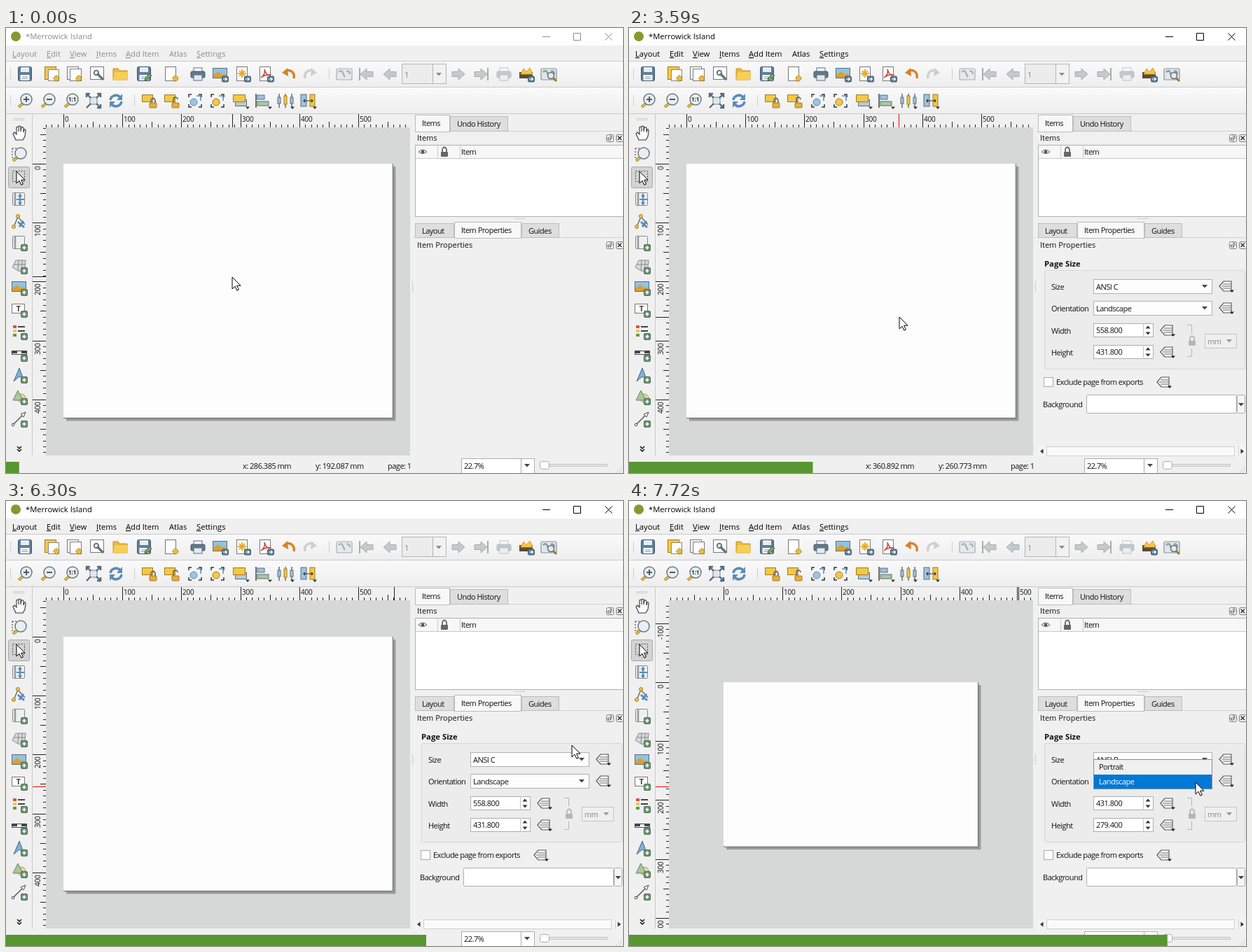
Recreate the animation shown at these times as an HTML page. Size 881 px wide and 636 px high, loop 8000 ms.

```html
<!DOCTYPE html>
<html lang="en">
<head>
<meta charset="utf-8">
<title>Layout page size</title>
<style>
html, body { margin: 0; width: 100%; height: 100%; overflow: hidden; background: #f0f0f0; }
svg { display: block; }
text { font: 11px 'Open Sans', 'Noto Sans', sans-serif; white-space: pre; }
.n { letter-spacing: -.5px; }
.m { font-size: 11.2px; }
.b { font-weight: bold; font-size: 11.3px; }
.s { font-size: 10px; letter-spacing: -.2px; }
</style>
</head>
<body>
<svg id="stage" xmlns="http://www.w3.org/2000/svg" width="881" height="636" viewBox="0 0 881 636"></svg>
<script>
// ---- drawing helpers
const R = (x, y, w, h, f = 'none', s = 'none', k = 1, r = 0) =>
  `<rect x="${x}" y="${y}" width="${w}" height="${h}" rx="${r}" fill="${f}" stroke="${s}" stroke-width="${k}"/>`;
const P = (d, f = 'none', s = 'none', k = 1) =>
  `<path d="${d}" fill="${f}" stroke="${s}" stroke-width="${k}"/>`;
const C = (x, y, r, f = 'none', s = 'none', k = 1) =>
  `<circle cx="${x}" cy="${y}" r="${r}" fill="${f}" stroke="${s}" stroke-width="${k}"/>`;
const T = (x, y, t, c = 'n', f = '#111', more = '') =>
  `<text x="${x}" y="${y}" class="${c}" fill="${f}" ${more}>${t}</text>`;
const at = (x, y, s, o = 1) => `<g transform="translate(${x} ${y})" opacity="${o}">${s}</g>`;
const G = (id, s, more = '') => `<g id="${id}" ${more}>${s}</g>`;
const box = (x, y, w, h, f = '#fff', s = '#adadad', r = 0) => R(x + .5, y + .5, w - 1, h - 1, f, s, 1, r);
const row = (y, ...icons) => icons.map(([x, s, o]) => at(x, y, s, o)).join('');
const dots = (x, y, n, dx, dy) =>
  Array.from({ length: n }, (_, i) => R(x + i * dx, y + i * dy, 1, 1, '#aaa')).join('');

// ---- icons, centred on the origin
const slate = '#5c6f7c', blue = '#5b8cb8', gold = '#f4c845', brown = '#a07c22';
const down = P('M-4-2H4L0 2.5Z', '#444');
const badge = at(7, 7, R(-4.5, -4.5, 9, 9, '#6f9474', '#4c6b52', 1, 1.5) + P('M-2.5 0H2.5M0-2.5V2.5', 'none', '#fff', 1.5));
const out = at(7, 7, R(-4.5, -4, 9, 8, '#5a7d97', '#3d5a70', 1, 1.5) + P('M-3 0H2M0-2L2.5 0 0 2', 'none', '#fff', 1.2));
const spark = at(6, 6, C(0, 0, 3.5, '#f7d34f', brown) + P('M0-5.5V5.5M-5.5 0H5.5', 'none', '#e0ae2c'));
const sheet = R(-8.5, -10.5, 15, 20, '#fff', '#777');
const floppy = R(-9.5, -10.5, 19, 20, '#5f7f9b', '#3c566d', 1, 2) + R(-6, -10, 12, 7, '#e6edf2') + R(-6.5, 1, 13, 8, '#f8f8f8') + P('M-4 4H4M-4 6.5H4', 'none', '#8a9aa6');
const wrench = P('M-1-1L8 8', 'none', '#68757e', 3.5) + C(-2, -2, 3.2, 'none', '#68757e', 2);
const pencil = P('M1 9L2 5 8-1 11 2 5 8Z', '#7aa06c', '#46613c');
const folder = P('M-10 8V-8H-3L-1-5H10V8Z', '#e9b93c', '#c59420') + P('M-10 8L-8-3H10V8Z', '#f7ce57');
const printer = R(-6, -9, 12, 6, '#fff', slate) + R(-10, -4, 20, 9, '#64798a', '#46596a', 1, 1.5) + R(-6, 1, 12, 8, '#dfeaf2', slate);
const photo = R(-10.5, -8.5, 20, 14, '#8ec3e6', slate) + P('M-10 5V1L-3-4 3 1 6-1 10 2V5Z', '#dca02e');
const arrow = P('M8 6C10-5 0-7-4-4', 'none', '#d9822b', 3.5) + P('M-9-2L-1-9 0 3Z', '#d9822b');
const map = R(-11, -8, 22, 16, '#e2e6e8', '#87919a', 1.2, 2) + P('M-8-3Q-4-7-2-2T1 4M3-4Q7-6 8 0', 'none', '#8b98a1', 2.5);
const step = P('M-9 0L0-8V-3.5H9V3.5H0V8Z', '#b8c0c5', '#929ca3');
const jump = step + P('M-10-9V9', 'none', '#929ca3', 2);
const flip = s => `<g transform="scale(-1 1)">${s}</g>`;
const lens = s => P('M-3 4L-9 9', 'none', brown, 4) + P('M-3 4L-9 9', 'none', gold, 2) + C(2, -2, 8, '#e8eff3', '#6d7880', 1.5) + at(2, -2, s);
const lock = P('M-3 0V-3A3 3.5 0 0 1 3-3V0', 'none', '#666', 1.8) + R(-5, 0, 10, 7, '#666', 'none', 1, 1);
const padlock = c => R(-10.5, -8.5, 15, 10, gold, brown) + at(5, 3, P(c, 'none', '#6b6b6b', 1.8) + R(-5, 0, 10, 7, '#e9ad3a', brown, 1, 1));
const corners = P('M-9-5V-9H-5M5-9H9V-5M9 5V9H5M-5 9H-9V5', 'none', '#333', 1.5);
const shapes = C(-2, 2, 5, '#9fc3e0', blue) + P('M2-7H8V0', 'none', blue, 1.5);
const drop = at(10, 10, P('M-3-1.5H3L0 2Z', '#333'));
const pointer = P('M0 0V17L4 13.2 6.8 19.2 9.4 18 6.7 12.2H12Z', '#fff', '#000', 1);
const override = P('M-9 0L-3-7H8V7H-3Z', '#fdfdfd', '#555', 1.2) + P('M-4-3H7M-6 0H7M-4 3H7', 'none', '#666', 1.2) + at(9, 7, P('M-3-1.5H3L0 2Z', '#222'));
const mapBase = R(-9.5, -9.5, 17, 18, '#eef0f0', '#888', 1, 1) + P('M-6-9V8', 'none', '#999', 2.5);

// ---- window chrome
const menus = [['Layout', 9], ['Edit', 58], ['View', 91], ['Items', 129], ['Add Item', 171], ['Atlas', 233], ['Settings', 272]]
  .map(([s, x]) => T(x, 41, s === 'Atlas' ? s : `<tspan text-decoration="underline">${s[0]}</tspan>${s.slice(1)}`, 'm', 'currentColor')).join('');
const head = R(0, 0, 881, 25, '#fff') + C(14, 12, 7, '#809c2e') + G('head',
  T(28, 16, '*Merrowick Island', 'm', 'currentColor') + menus +
  P('M766 12.5H777M810.5 7.5H820.5V17.5H810.5ZM855.5 7.5L865.5 17.5M865.5 7.5L855.5 17.5', 'none', 'currentColor'));

const bar1 = row(66,
  [27, floppy], [66, R(-10.5, -10.5, 16, 18, gold, brown) + R(-5.5, -6.5, 15, 16, '#fff', '#888') + spark],
  [98, R(-10.5, -10.5, 16, 18, '#fff', '#777') + R(-6.5, -7.5, 16, 17, '#fff', '#777') + spark],
  [131, R(-10.5, -10.5, 19, 18, '#fff', '#777') + wrench], [163, folder], [197, floppy + pencil], [236, sheet + spark],
  [274, printer], [306, photo + out], [338, sheet + P('M-1-7V5M-7-1H5M-5-5L3 3M3-5L-5 3', 'none', '#e3ae2f', 2) + out],
  [371, sheet + P('M-7 5Q0 0-2-7Q1 3 6 1Q0 0-7 5', 'none', '#c8443a', 1.5) + out], [403, arrow],
  [435, flip(P('M8 6C10-5 0-7-4-4', 'none', '#999', 3.5) + P('M-9-2L-1-9 0 3Z', '#999')), .4],
  [483, map, .7], [515, jump, .8], [548, step, .8], [646, flip(step), .8], [678, flip(jump), .8], [711, printer, .35],
  [743, R(-10, -3, 19, 9, '#5c4a36') + P('M-8 0L-4-8 0-3 5-9 9 0Z', gold, '#d39a27') + out], [775, map + C(3, 2, 4.5, '#dfeaf2', slate, 1.5) + P('M6 5L11 10', 'none', brown, 3)])
  + box(565, 51, 64, 29, '#f2f2f2', '#b5b5b5') + box(565, 51, 45, 29, '#ececec', '#b5b5b5') + T(569, 71, '1', 'n', '#888') + at(618, 66, down, .6);
const bar2 = row(104,
  [27, lens(P('M-4 0H4M0-4V4', 'none', '#4a5b66', 2))], [60, lens(P('M-4 0H4', 'none', '#4a5b66', 2))], [93, lens(T(-6, 3, '1:1', 'b', '#333', 'style="font-size:8px"'))],
  [125, R(-5, -5, 10, 10, '#dfe8ee', '#77848c') + P('M-10-10L-4-4M10-10L4-4M-10 10L-4 4M10 10L4 4M-10-5V-10H-5M5-10H10V-5M10 5V10H5', 'none', '#4f6b80', 2.4)],
  [157, P('M-8-1A8 8 0 0 1 6-5M8 1A8 8 0 0 1-6 5', 'none', blue, 3.5) + P('M9-10V-1H1ZM-9 10V1H-1Z', blue)],
  [205, padlock('M-3 0V-3A3 3.5 0 0 1 3-3V0')], [237, padlock('M-3 0V-4A3 3.5 0 0 1 3-5')],
  [270, corners + shapes], [302, corners + C(-2, 2, 5, gold, brown) + P('M2-7H8V0', 'none', blue, 1.5)],
  [335, R(-7.5, -1.5, 16, 9, '#b7c9d6', slate) + R(-10.5, -8.5, 17, 10, gold, brown) + drop],
  [367, P('M-10-10V10', 'none', '#444', 1.5) + R(-8, -8, 10, 6, '#9fc3e0', slate) + R(-8, 1, 16, 6, '#a9c7a2', slate) + drop],
  [399, P('M-9-10V10M0-10V10M9-10V10', 'none', '#555', 1.3) + R(-11, -5, 4, 9, '#9fc3e0', slate) + R(-2, -7, 4, 12, gold, brown) + R(7, -5, 4, 9, '#9fc3e0', slate) + drop],
  [431, R(-10, -9, 8, 17, '#9fc3e0', slate) + R(3, -9, 7, 17, gold, brown) + P('M-6 0H7M-4-2L-6 0-4 2M5-2L7 0 5 2', 'none', '#333', 1.2) + drop]);

const tools = [
  [150, P('M-5 10L-9 1-7-1-4 2V-8Q-2-10-1-8V-2-9Q1-11 2-9V-2L3-8Q5-9 6-7V-1L7-5Q9-6 9-3L8 5 5 10Z', '#fff', '#333', 1.1)],
  [181, `<rect x="-10" y="-9" width="13" height="14" fill="none" stroke="#333" stroke-dasharray="2 2"/>` + lens('')],
  [213, box(-16, -15, 31, 31, '#d3d3d3', '#a8a8a8', 2) + `<rect x="-9.500" y="-8.500" width="17" height="15" fill="none" stroke="#444" stroke-dasharray="2 2"/>` + at(-4, -8, pointer)],
  [245, mapBase + P('M1-6V6M-4 0H7M-1-4L1-7 3-4M-1 4L1 7 3 4', 'none', blue, 2.2)],
  [276, P('M-8 8L-2-6 8 5', 'none', slate, 1.5) + C(-2, -7, 2.5, gold, brown) + C(-8, 8, 2.5, gold, brown) + P('M-2 1L7 9M6 0L0 8', 'none', blue, 3)],
  [307, mapBase + badge], [340, P('M-10 2L-5-8H9L8 2 0 8Z', '#d5dadd', '#888') + P('M-8-2H8M-1-8L-2 7M4-8V4', 'none', '#888') + badge],
  [371, photo + badge], [402, box(-11, -8, 19, 14, '#fff', '#777') + T(-4.5, 3, 'T', 'b', '#444') + badge],
  [434, R(-9, -9, 5, 4, '#d6534a') + R(-9, -3, 5, 4, gold) + R(-9, 3, 5, 4, '#5d9a55') + P('M-2-7H8M-2-1H8', 'none', '#444', 2) + badge],
  [465, box(-11, -4, 22, 6, '#fff', '#444') + R(-10, -3, 7, 3, '#444') + R(3, -3, 7, 3, '#444') + badge],
  [496, P('M-8 9L0-10 6 6 0 2Z', '#7fb0d8', '#3f6788') + badge],
  [527, C(3, 2, 6, '#e6d3a0', '#b49c58') + P('M-9 5L-2-9 5 5Z', '#a9c7a2', '#5f8a58') + badge],
  [559, P('M-9 8L6-7', 'none', '#555', 1.4) + P('M9-10L2-7 6-3Z', '#fff', '#444') + C(-9, 8, 1.8, '#fff', '#444') + badge],
  [602, P('M-3-4L0-1 3-4M-3 0L0 3 3 0', 'none', '#111', 1.5)]
].map(([y, s]) => at(19, y, s)).join('');

const dockButtons = y => at(862, y, box(-5, -5, 11, 11, '#f6f6f6', '#777', 2) + P('M-2.5 0H1.500V3H-2.500ZM0-2.500H3V1', 'none', '#555')) +
  at(876, y, box(-5, -5, 11, 11, '#f6f6f6', '#777', 2) + P('M-2.500-2.500L3 3M3-2.500L-2.500 3', 'none', '#333', 1.5));
const tab = (x, y, w, h, s, on) => box(x, y, w, h, on ? '#f8f8f8' : '#dedede', '#bcbcbc') + T(x + 10, y + (on ? 16 : 15), s);
const docks = R(583, 123, 298, 488, '#f0f0f0') + P('M583 147.500H881M583 299.500H881', 'none', '#d0d0d0') +
  tab(634, 126, 83, 22, 'Undo History') + tab(584, 124, 50, 25, 'Items', 1) + T(587, 161, 'Items', '') + dockButtons(157) +
  box(584, 167, 300, 103, '#fff', '#b0b0b0') + R(585, 168, 296, 18, '#f7f7f7') + P('M585 186.500H881M616.500 168V186M648.500 168V186', 'none', '#c9c9c9') +
  at(595, 177, P('M-6 0Q0-6 6 0Q0 5-6 0Z', '#eee', '#666') + C(0, 0, 2.3, '#555')) + at(626, 177, lock) + T(650, 181, 'Item') +
  dots(726, 272, 8, 2, 0) + dots(580, 362, 8, 0, 2) +
  tab(584, 279, 56, 21, 'Layout') + tab(736, 279, 54, 21, 'Guides') + tab(640, 277, 96, 24, 'Item Properties', 1) +
  T(587, 314, 'Item Properties', '') + dockButtons(310);

const combo = (x, y, w, id, s) => box(x, y, w, 21, '#fdfdfd', '#b0b0b0') + T(x + 4, y + 15, s, 'n', '#111', `id="${id}"`) + at(x + w - 11, y + 10, down);
const spin = (y, id) => box(663, y, 86, 20) + P(`M734.500 ${y}V${y + 20}`, 'none', '#c4c4c4') + T(667, y + 14, '', 'n', '#111', `id="${id}"`) +
  at(741, y + 10, P('M-3.500-2.500H3.500L0-6.500ZM-3.500 2.500H3.500L0 6.500Z', '#333'));
const form = T(593, 341, 'Page Size', 'b') + box(593, 346, 287, 142, '#ececec', '#d6d6d6', 2) +
  [['Size', 374], ['Orientation', 405], ['Width', 437], ['Height', 468]].map(([s, y]) => T(603, y, s)).join('') +
  combo(663, 359, 170, 'size', '') + combo(663, 390, 170, 'orient', 'Landscape') + spin(422, 'wide') + spin(453, 'high') +
  [[852, 369], [852, 400], [768, 432], [768, 463], [763, 506]].map(p => at(...p, override)).join('') +
  P('M797 424.500H803.500V436M797 469.500H803.500V458', 'none', '#b5b5b5') + at(804, 447, lock, .4) +
  box(822, 437, 46, 21, '#efefef', '#c4c4c4') + T(826, 452, 'mm', 'n', '#888') + at(857, 447, down, .5) +
  box(592, 499, 14, 14, '#fff', '#aaa') + T(610, 510, 'Exclude page from exports') +
  T(591, 542, 'Background') + box(653, 524, 215, 27, '#fff', '#adadad', 2) + box(868, 524, 12, 27, '#f6f6f6', '#adadad', 2) + at(874, 538, down) +
  R(583, 598, 298, 14, '#f4f4f4') + box(596, 598, 269, 14, '#fafafa', '#d0d0d0') + P('M870.500 598V612', 'none', '#d0d0d0') +
  P('M591.500 601.500V608.500L587 605ZM873.500 601.500V608.500L878 605Z', '#333');

const status = T(338, 630, '', 'n', '#111', 'id="posX"') + T(442, 630, '', 'n', '#111', 'id="posY"') + T(545, 630, 'page: 1') +
  box(650, 615, 105, 22) + P('M735.500 615V636', 'none', '#adadad') + T(654, 630, '22.7%') + at(744, 625, down) +
  box(764, 623, 95, 4, '#e4e4e4', '#c6c6c6') + box(762, 619, 14, 12, '#fff', '#aaa', 3) +
  dots(872, 634, 4, 2, -2) + dots(876, 634, 2, 2, -2);

// ---- page view with rulers; k is pixels per millimetre
const k = .8417;
function view(id, ox, oy, w, h) {
  let s = R(57, 142, 520, 469, '#d6d8d7') + R(ox + 4, oy + 4, w * k, h * k, '#999') + R(ox, oy, w * k, h * k, '#fdfdfd') +
    P(`M${ox + w * k} ${oy}V${oy + h * k}H${ox}`, 'none', '#666');
  let ticks = '', labels = '';
  for (let mm = -200; mm <= 700; mm += 10) {
    const x = Math.round(ox + mm * k) + .5, y = Math.round(oy + mm * k) + .5;
    const len = mm % 100 ? (mm % 50 ? 4 : 8) : 19;
    if (x > 57 && x < 577) ticks += `M${x} 142V${142 - len}`;
    if (y > 142 && y < 611) ticks += `M57 ${y}H${57 - len}`;
    if (mm % 100) continue;
    if (x > 57 && x < 577) labels += T(x + 1.5, 134, mm, 's');
    if (y > 142 && y < 611) labels += T(0, 0, mm, 's', '#111', `text-anchor="end" transform="translate(49 ${y + 3}) rotate(-90)"`);
  }
  return G(id, s + P(ticks, 'none', '#222') + labels, 'clip-path="url(#canvas)"');
}

// ---- popups
const hot = (id, x, y, w, h) => R(x, y, w, h, '#0078d7', 'none', 1, 0).replace('<rect', `<rect id="${id}"`);
const context = box(323, 355, 195, 115, '#fdfdfd', '#a0a0a0') + P('M328 401.500H513', 'none', '#cfcfcf') + hot('menuHot', 324, 0, 193, 22) +
  [['Undo Change Page Size', 371, 'mi0'], ['Redo', 393], ['Page Properties...', 418, 'mi1'], ['Manage Guides for Page...', 440], ['Remove Page', 463]]
    .map(([s, y, id]) => T(350, y, s, 'm', /Re/.test(s) ? '#777' : '#111', id ? `id="${id}"` : '')).join('');
const series = (p, s) => [...s].map(c => p + c);
const sizes = [...series('A', '6543210'), ...series('B', '6543210'), 'Legal', 'Letter', ...series('ANSI ', 'ABCDE'),
  ...series('Arch ', 'ABCDE'), 'Arch E1', 'Arch E2', 'Arch E3', '1920×1080', '1280×800', '1024×768'];
const pitch = 20.56;
const sizeList = box(663, -2, 170, 640, '#f0f0f0', '#8c8c8c') + hot('sizeHot', 664, 0, 168, 20) +
  sizes.map((s, i) => T(671, Math.round(i * pitch) + 4, s, 'n', '#111', `id="z${i}"`)).join('');
const orientList = box(663, 369, 170, 43, '#f0f0f0', '#8c8c8c') + R(664, 391, 168, 20, '#0078d7') +
  T(671, 384, 'Portrait') + T(671, 405, 'Landscape', 'n', '#fff');

document.getElementById('stage').innerHTML =
  `<defs><linearGradient id="tb" x2="0" y2="1"><stop stop-color="#fafafa"/><stop offset="1" stop-color="#eee"/></linearGradient>
  <clipPath id="canvas"><path d="M38 123H577V611H38Z"/></clipPath></defs>` +
  R(0, 0, 881, 636, '#f0f0f0') + head + R(0, 47, 881, 37, 'url(#tb)') + R(0, 85, 881, 37, 'url(#tb)') +
  P('M0 47.500H881M0 84.500H881M0 122.500H881M37.500 123V611', 'none', '#c9c9c9') +
  [6, 461].map(x => dots(x, 58, 8, 0, 2)).join('') + [6, 183].map(x => dots(x, 96, 8, 0, 2)).join('') +
  dots(11, 129, 8, 2, 0) + dots(11, 131, 8, 2, 0) + bar1 + bar2 + tools +
  view('viewC', 82, 194, 558.8, 431.8) + view('viewB', 135, 259, 431.8, 279.4) +
  G('markX', P('M.5 123V142', 'none', 'currentColor')) + G('markY', P('M38 .5H57', 'none', 'currentColor')) +
  docks + G('form', form) + status + G('context', context) + G('sizeList', sizeList) + G('orientList', orientList) +
  G('cursor', pointer) + hot('progress', 0, 620, 0, 16).replace('#0078d7', '#589632');

// ---- timeline: step start times and pointer stops [step, x, y]
const times = [0, 1000, 1090, 1740, 1840, 1950, 2050, 2160, 2280, 2390, 2500, 2940, 3050,
  3590, 3690, 3800, 3900, 4010, 4120, 4220, 4330, 4450, 4540, 4670, 4890, 4980, 5200,
  5640, 5770, 5880, 5990, 6300, 6420, 6950, 7060, 7170, 7280, 7390, 7500, 7610, 7720];
const stops = [[0, 323.05, 355.68], [2, 323.05, 355.68], [3, 328, 363], [7, 368, 406], [10, 372, 412], [12, 372, 412],
  [13, 385.763, 413.493], [16, 554.3, 408.593], [18, 690, 390], [20, 803, 365], [22, 803, 365], [23, 814, 366],
  [25, 815, 360], [26, 813, 363], [27, 813, 363], [30, 808, 349], [32, 808, 349], [38, 809, 402], [40, 809, 402]];

function pointerAt(n) {
  const i = Math.max(1, stops.findIndex(s => s[0] >= n));
  const [a, x, y] = stops[i - 1], [b, x2, y2] = stops[i], u = (n - a) / (b - a);
  return [x + (x2 - x) * u, y + (y2 - y) * u];
}

const $ = id => document.getElementById(id);
const show = (id, on) => { $(id).style.display = on ? '' : 'none'; };
const fill = (id, on) => $(id).setAttribute('fill', on ? '#fff' : '#111');
const move = (id, x, y) => $(id).setAttribute('transform', `translate(${x} ${y})`);

function draw(n) {
  const [x, y] = pointerAt(n);
  move('cursor', Math.round(x), Math.round(y));
  $('head').style.color = n ? '#000' : '#8c8c8c';
  $('progress').setAttribute('width', 18.75 * (n + 1));

  // rulers follow the pointer only over the canvas
  const [mx, my] = pointerAt(n < 13 ? 0 : Math.min(n, 16));
  move('markX', Math.floor(mx), 0);
  move('markY', 0, Math.floor(my));
  $('markX').style.color = n > 12 && n < 16 ? '#f00' : '#222';
  $('markY').style.color = n > 15 ? '#e00' : '#222';
  $('posX').textContent = `x: ${((mx - 82) / k).toFixed(3)} mm`;
  $('posY').textContent = `y: ${((my - 194) / k).toFixed(3)} mm`;

  const item = n < 3 || y > 378 && y < 402 ? -1 : y < 379 ? 0 : 1;
  show('context', n > 1 && n < 11);
  show('menuHot', item >= 0);
  $('menuHot').setAttribute('y', item ? 403 : 357);
  fill('mi0', item === 0);
  fill('mi1', item === 1);

  const small = n > 31, pick = y < 359 ? 17 : 18;
  show('form', n > 11);
  show('viewC', !small);
  show('viewB', small);
  $('size').textContent = small ? 'ANSI B' : 'ANSI C';
  $('wide').textContent = small ? '431.800' : '558.800';
  $('high').textContent = small ? '279.400' : '431.800';
  show('sizeList', n > 24 && n < 31);
  $('sizeHot').setAttribute('y', Math.round(pick * pitch) - 10);
  fill('z17', pick === 17);
  fill('z18', pick === 18);
  show('orientList', n > 38);
}

const start = performance.now();
let last = -1;
function tick() {
  const t = (performance.now() - start) % 8000;
  const n = times.filter(s => s <= t).length - 1;
  if (n !== last) draw(last = n);
  requestAnimationFrame(tick);
}
tick();
</script>
</body>
</html>
```
